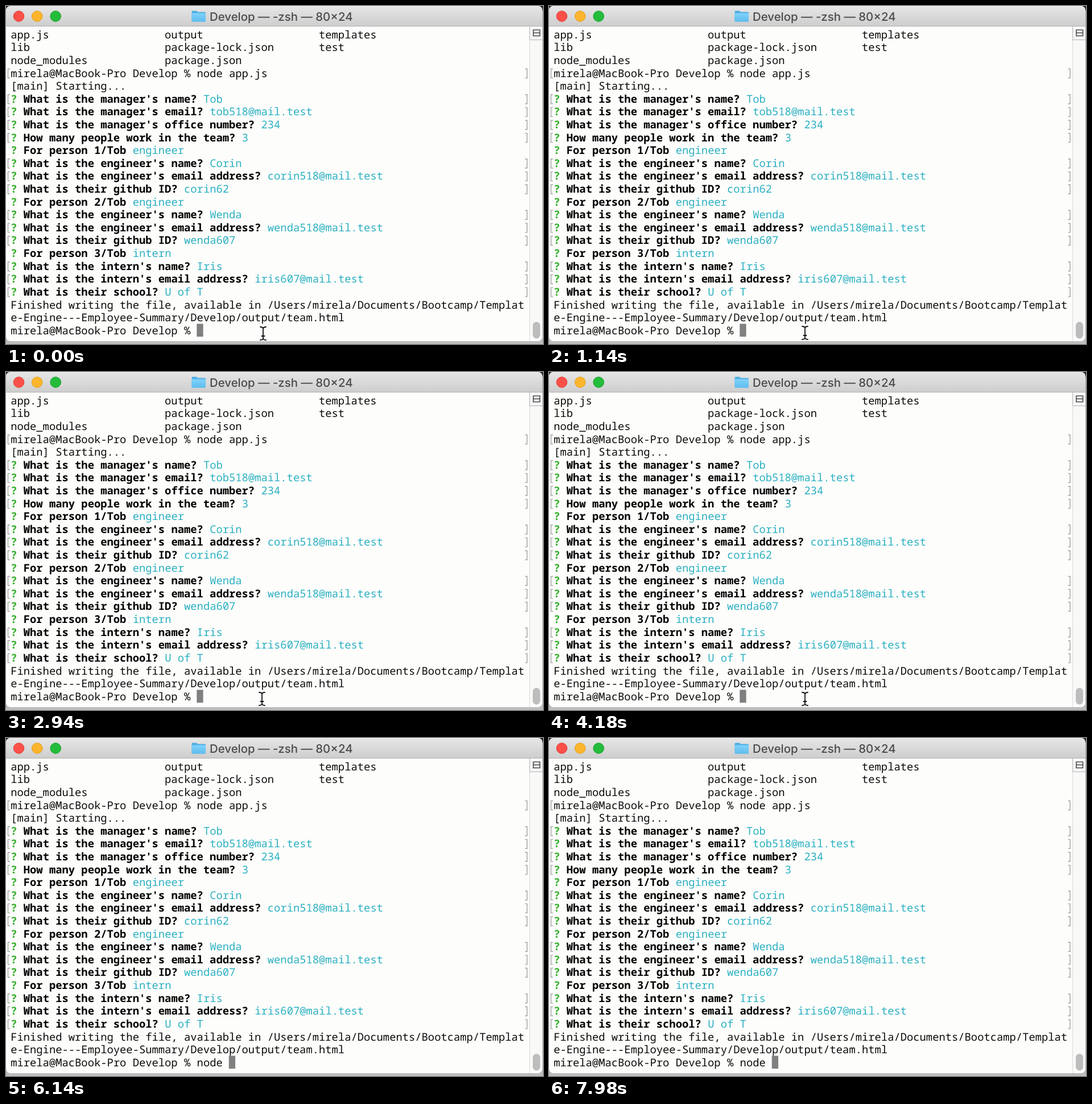
An HTML page for the animation above (8000 ms loop, 944 px wide and 594 px high).

```html
<!DOCTYPE html>
<html lang="en">
<head>
<meta charset="utf-8">
<title>Terminal</title>
<style>
  html, body { margin: 0; width: 100%; height: 100%; overflow: hidden; background: #b4b4b4; }
  svg { display: block; width: 944px; height: 594px; }
  text { white-space: pre; text-rendering: geometricPrecision; }
  #screen text { font: 18.82px "Noto Sans Mono", "DejaVu Sans Mono", monospace; fill: #0c0c0c; }
  #screen .bold { font-weight: 700; fill: #000; }
  #screen .mark { font-weight: 700; fill: #35b02c; }
  #screen .answer { fill: #2bb0c2; }
  #screen path { fill: none; stroke: #a2a2a2; stroke-width: 1.4; }
  .title { font: 500 20.4px Inter, "Open Sans", sans-serif; fill: #4b4b4b; }
</style>
</head>
<body>
<svg viewBox="0 0 944 594">
  <defs>
    <linearGradient id="bar" x2="0" y2="1">
      <stop stop-color="#e6e6e6"/><stop offset="1" stop-color="#cdcdcd"/>
    </linearGradient>
    <linearGradient id="folder" x2="0" y2="1">
      <stop stop-color="#80d2fb"/><stop offset="1" stop-color="#5fbdee"/>
    </linearGradient>
    <linearGradient id="shadow" x2="0" y2="1">
      <stop stop-color="#a2a2a2"/><stop offset="1" stop-color="#c0c0c0"/>
    </linearGradient>
  </defs>

  <rect width="944" height="300" fill="#26262c"/>
  <rect y="570" width="944" height="24" fill="url(#shadow)"/>
  <rect width="943" height="589" rx="8" fill="#fdfdfb"/>
  <path d="M0 36V8a8 8 0 0 1 8-8H935a8 8 0 0 1 8 8V36Z" fill="url(#bar)"/>
  <path d="M8 .5H935" stroke="#f3f3f3"/>
  <path d="M0 35.5H943" stroke="#b0b0b0"/>
  <path d="M943.5 8V582" stroke="#a4a4a4"/>

  <g stroke-width="1">
    <circle cx="22.5" cy="18" r="9.3" fill="#fc5049" stroke="#e04039"/>
    <circle cx="54.8" cy="18" r="9.3" fill="#fcb52c" stroke="#dfa023"/>
    <circle cx="87.2" cy="18" r="9.3" fill="#23bc3b" stroke="#1ba22f"/>
  </g>
  <path d="M326.500 10q0-1.500 1.500-1.500h7l2 2h12.500q1.500 0 1.500 1.500v14q0 1.500-1.500 1.500h-21.500q-1.500 0-1.500-1.500Z" fill="#4eaee2"/>
  <rect x="326.500" y="12.500" width="24.500" height="15" rx="1.500" fill="url(#folder)"/>
  <text class="title" x="358" y="25.500">Develop — -zsh — 80×24</text>

  <rect x="920" y="36" width="23" height="545" fill="#f9f9f8"/>
  <path d="M920.500 36V589" stroke="#dadada"/>
  <path d="M920.500 36V59.500H943" fill="#f4f4f4" stroke="#b4b4b4"/>
  <path d="M927 42H938.500V52.500H927ZM927 47.200H938.500" fill="none" stroke="#4b4b4b" stroke-width="1.600"/>
  <rect x="926" y="555" width="13" height="29.500" rx="6.500" fill="#bdbdbd"/>

  <g id="screen"></g>
  <rect id="caret" y="558.500" width="11.300" height="22.600" fill="#808080"/>
  <g id="pointer" fill="none" stroke-linecap="round">
    <path id="beam" d="M-5-11.500Q-1-11.500 0-9Q1-11.500 5-11.500M-5 11.500Q-1 11.500 0 9Q1 11.500 5 11.500M0-9V9M-2.500 4.500H2.500" stroke="#fff" stroke-width="3.600"/>
    <use href="#beam" stroke="#000"/>
    <path d="M-5-11.500Q-1-11.500 0-9Q1-11.500 5-11.500M-5 11.500Q-1 11.500 0 9Q1 11.500 5 11.500M0-9V9M-2.500 4.500H2.500" stroke="#111" stroke-width="1.800"/>
  </g>
</svg>
<script>
const LOOP = 8000, LEFT = 8.2, CELL = 11.29, BASE = 56.7, ROW = 22.61;
const PROMPT = 'mirela@MacBook-Pro Develop % ';

// ">" marks an entered line, "?" a question, "|" separates its answer.
const lines = [
  'app.js'.padEnd(24) + 'output'.padEnd(24) + 'templates',
  'lib'.padEnd(24) + 'package-lock.json'.padEnd(24) + 'test',
  'node_modules'.padEnd(24) + 'package.json',
  '>' + PROMPT + 'node app.js',
  '[main] Starting...',
  ">? What is the manager's name? |Tob",
  ">? What is the manager's email? |tob518@mail.test",
  ">? What is the manager's office number? |234",
  '>? How many people work in the team? |3',
  '? For person 1/Tob |engineer',
  ">? What is the engineer's name? |Corin",
  ">? What is the engineer's email address? |corin518@mail.test",
  '>? What is their github ID? |corin62',
  '? For person 2/Tob |engineer',
  ">? What is the engineer's name? |Wenda",
  ">? What is the engineer's email address? |wenda518@mail.test",
  '>? What is their github ID? |wenda607',
  '? For person 3/Tob |intern',
  ">? What is the intern's name? |Iris",
  ">? What is the intern's email address? |iris607@mail.test",
  '>? What is their school? |U of T',
  'Finished writing the file, available in /Users/mirela/Documents/Bootcamp/Templat',
  'e-Engine---Employee-Summary/Develop/output/team.html',
  PROMPT
];

const screen = document.getElementById('screen');
const caret = document.getElementById('caret');
const pointer = document.getElementById('pointer');

function add(name, attributes, content = '') {
  const node = document.createElementNS('http://www.w3.org/2000/svg', name);
  for (const key in attributes) node.setAttribute(key, attributes[key]);
  node.textContent = content;
  return screen.appendChild(node);
}

const write = (row, column, content, style = '') =>
  add('text', { x: LEFT + column * CELL, y: BASE + row * ROW, class: style }, content);

lines.forEach((line, row) => {
  if (line[0] === '>') {
    line = line.slice(1);
    const top = BASE + row * ROW - 14;
    add('path', { d: `M7 ${top}H3.500v16H7M912.500 ${top}H916v16H912.500` });
  }
  if (line[0] !== '?') return write(row, 0, line);
  const [question, answer] = line.split('|');
  write(row, 0, '?', 'mark');
  write(row, 2, question.slice(2), 'bold');
  write(row, question.length, answer, 'answer');
});

const typed = write(lines.length - 1, PROMPT.length, '');
const keyTimes = [5060, 5300, 5600, 5820, 6040];

function draw(now) {
  const t = now % LOOP;
  const count = keyTimes.filter(time => t >= time).length;
  typed.textContent = 'node '.slice(0, count);
  caret.setAttribute('x', LEFT - .3 + (PROMPT.length + count) * CELL);
  const x = t < 240 ? 452 : t < 1000 ? 451 : 450;
  pointer.setAttribute('transform', `translate(${x} ${t < 240 ? 575.5 : 574.5})`);
  pointer.style.display = count ? 'none' : '';
  requestAnimationFrame(draw);
}
draw(performance.now());
</script>
</body>
</html>
```
